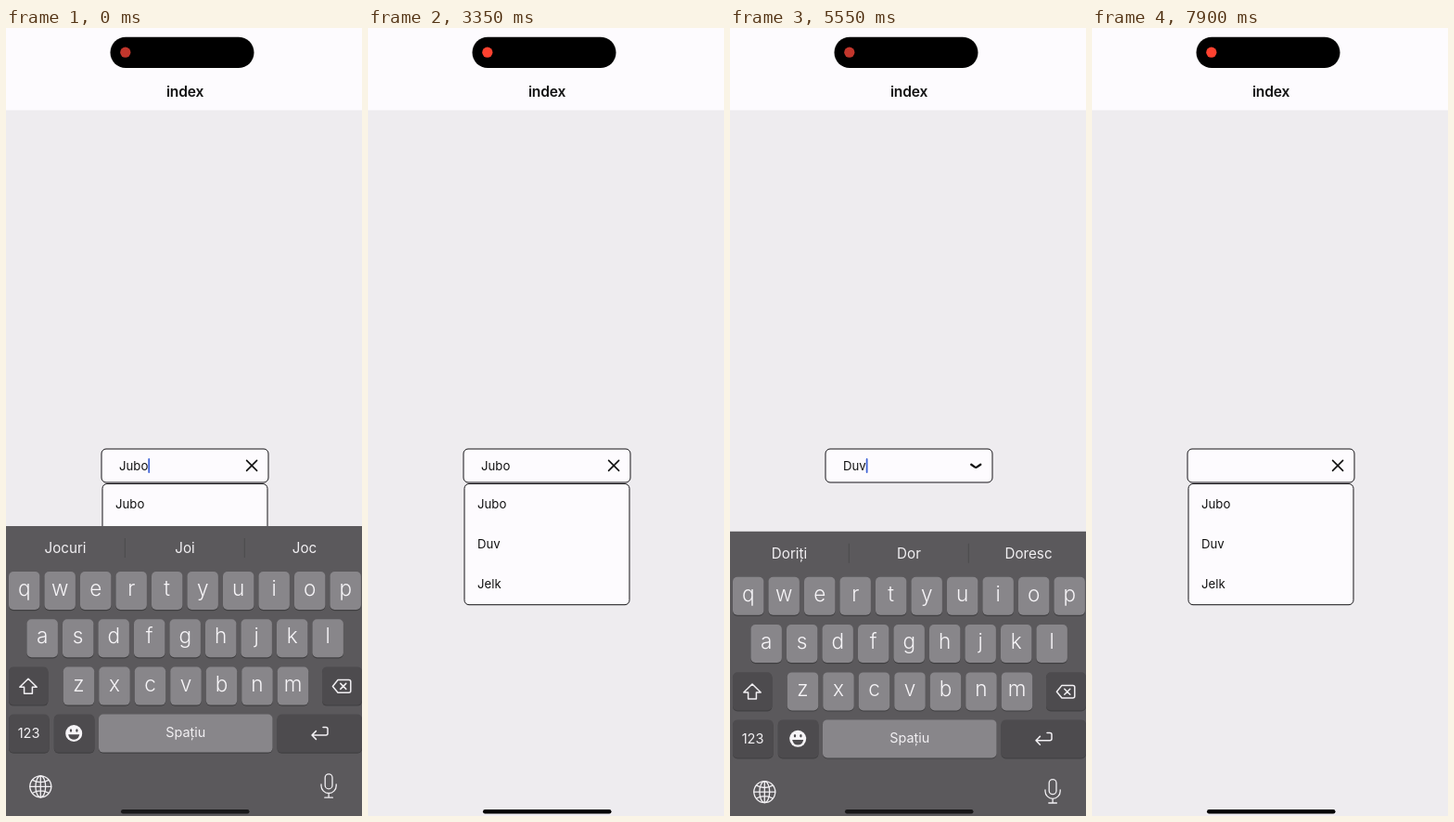
Write an HTML page that moves like this. It is 384 px wide and 848 px high and loops after 8 s.

```html
<!DOCTYPE html>
<html lang="ro">
<head>
<meta charset="utf-8">
<title>index</title>
<style>
  html, body { margin: 0; width: 100%; height: 100%; overflow: hidden; background: #eeecef; }
  svg { display: block; width: 384px; height: 848px; }
  text { font-family: Inter, Roboto, "Liberation Sans", sans-serif; white-space: pre; }
  .field { font-size: 13.2px; fill: #111; }
  .mid { text-anchor: middle; }
  .key { font-weight: 300; fill: #f6f4f7; }
  .label { fill: #f2f0f3; }
  .line { fill: none; stroke: #f2f0f3; stroke-width: 1.5; stroke-linecap: round; stroke-linejoin: round; }
  .box { fill: #fdfbfe; stroke: #141316; }
  .dark { fill: none; stroke: #111; stroke-linecap: round; }
</style>
</head>
<body>
<svg viewBox="0 0 384 848">
  <rect width="384" height="848" fill="#eeecef"/>
  <rect width="384" height="88.5" fill="#fdfbfe"/>
  <rect x="112.5" y="9.7" width="155" height="33.3" rx="16.6"/>
  <circle id="dot" cx="128.8" cy="26.2" r="5.6"/>
  <text class="mid" x="193" y="74" font-size="15.6" font-weight="600" letter-spacing="-.2" fill="#111">index</text>

  <rect class="box" x="103" y="453" width="180" height="36" rx="5"/>
  <text id="value" class="field" x="122" y="475.6"></text>
  <rect id="caret" y="463" width="1.8" height="16" rx=".9" fill="#3f63d6"/>
  <path id="cross" class="dark" stroke-width="1.6" d="M259.6 465.4 270.6 476.4M270.6 465.4 259.6 476.4"/>
  <path id="chevron" class="dark" stroke-width="2.3" d="M260.2 469.8 263.9 472.4Q265.2 473.3 266.5 472.4L270.3 469.8"/>
  <g id="list">
    <rect class="box" x="104" y="490.5" width="178" height="130.2" rx="5"/>
  </g>

  <g id="board">
    <rect y="536" width="384" height="312" fill="#5b595c"/>
    <path d="M128.3 549V570M257.3 549V570" stroke="#4c4a4d"/>
    <g id="hints"></g>
    <g id="keys"></g>
    <path id="shift" class="line" d="M24 700.3 33.2 709.2H28.4V716.3H19.6V709.2H14.8Z"/>
    <path class="line" d="M358 701.6H369.8a2 2 0 0 1 2 2V713.2a2 2 0 0 1-2 2H358L352.4 708.4ZM360.8 705.4 366.8 711.4M366.8 705.4 360.8 711.4"/>
    <path class="line" d="M342 752.6H345a2 2 0 0 1 2 2V759a2 2 0 0 1-2 2H330M334.4 756.6 330 761 334.4 765.4"/>
    <text class="label mid" x="24.6" y="764" font-size="14.6">123</text>
    <text class="label mid" x="193.8" y="763.2" font-size="14.4">Spațiu</text>
    <circle cx="73.2" cy="759" r="9" fill="#f6f4f7"/>
    <g fill="#4f4d50">
      <ellipse cx="70" cy="756" rx="1.2" ry="1.7"/>
      <ellipse cx="76.4" cy="756" rx="1.2" ry="1.7"/>
      <path d="M67.2 760.2H79.2Q78.2 765.8 73.2 765.8T67.2 760.2Z"/>
    </g>
    <g class="line" style="stroke-width:1.3">
      <circle cx="37.3" cy="816.3" r="11.5"/>
      <ellipse cx="37.3" cy="816.3" rx="5.4" ry="11.5"/>
      <path d="M25.8 816.3H48.8M37.3 804.8V827.8M28.6 809.4Q37.3 814 46 809.4M28.6 823.2Q37.3 818.6 46 823.2"/>
      <rect x="344.2" y="802.8" width="7.8" height="16" rx="3.9"/>
      <path d="M340 814V815.4a8.1 8.1 0 0 0 16.2 0V814M348.1 823.6V828M343.8 828.2H352.4"/>
    </g>
  </g>
  <rect id="home" x="124" y="841" width="138.5" height="4.4" rx="2.2"/>
</svg>
<script>
const LOOP = 8000, DROP = 312;
const HIDE = 475, CLOSE = 3900, SHOW = 5300, OPEN = 6000, CLEAR = 6480, HIDE2 = 7400;
const NAMES = ["Jubo", "Duv", "Jelk"];
const VALUES = [[0, NAMES[0]], [CLOSE, NAMES[1]], [6150, NAMES[1].slice(0, 2)], [6330, "D"], [CLEAR, ""]];
const HINTS = [[0, ["Jocuri", "Joi", "Joc"]], [2000, ["Doriți", "Dor", "Doresc"]], [6330, ["„D”", "", ""]]];

const $ = id => document.getElementById(id);
const clamp = v => Math.max(0, Math.min(1, v));
const at = (table, t) => table.filter(row => row[0] <= t).pop()[1];
const show = (el, on) => el.style.display = on ? "" : "none";

function add(parent, tag, attrs, text = "") {
  const el = document.createElementNS("http://www.w3.org/2000/svg", tag);
  for (const k in attrs) el.setAttribute(k, attrs[k]);
  el.textContent = text;
  return parent.appendChild(el);
}

function key(x, y, w, fill) {
  add($("keys"), "rect", { x, y: y + 1.2, width: w, height: 41, rx: 5, fill: "#414042" });
  return add($("keys"), "rect", { x, y, width: w, height: 41, rx: 5, fill });
}

NAMES.forEach((n, i) => add($("list"), "text", { class: "field", x: 118, y: 517.2 + 43 * i }, n));

const letters = [];
[["qwertyuiop", 3], ["asdfghjkl", 22.5], ["zxcvbnm", 61.8]].forEach(([row, x0], r) => {
  [...row].forEach((ch, i) => {
    const x = x0 + 38.5 * i, y = 585 + 51.3 * r;
    key(x, y, 33.4, "#88868a");
    letters.push({ ch, y, el: add($("keys"), "text", { class: "key mid", x: x + 16.7 }) });
  });
});
const DIM = "#4d4b4e";
const shiftKey = key(3, 687.4, 42.4, DIM);
key(341, 687.4, 43, DIM);
key(3, 738.6, 43.6, DIM);
key(51.8, 738.6, 43.6, DIM);
key(100, 738.6, 187.5, "#88868a");
key(292.5, 738.6, 91.5, DIM);

// Critically damped spring, 0 to 1
function spring(ms) {
  const x = Math.max(0, ms) * 0.0236;
  return 1 - (1 + x) * Math.exp(-x);
}

function setCase(upper) {
  for (const { ch, y, el } of letters) {
    el.textContent = upper ? ch.toUpperCase() : ch;
    el.setAttribute("y", y + (upper ? 28.4 : 26));
    el.setAttribute("font-size", upper ? 21 : 22.6);
  }
  shiftKey.setAttribute("fill", upper ? "#dcdadd" : DIM);
  $("shift").style.fill = upper ? "#000" : "none";
  $("shift").style.stroke = upper ? "#000" : "";
}

let hintSpans = [];
function setHints(words) {
  $("hints").textContent = "";
  hintSpans = [];
  words.forEach((word, i) => {
    const el = add($("hints"), "text", { class: "label mid", x: 64 + 129 * i, y: 565, "font-size": 15.2 });
    [...word].forEach((ch, j) => hintSpans.push([add(el, "tspan", {}, ch), j]));
  });
}

let lastCase, lastHints, lastValue;
function draw(t) {
  const beat = clamp(0.5 + 0.9 * Math.cos((t - 530) / 1500 * 2 * Math.PI));
  const mix = (a, b) => Math.round(a + (b - a) * beat);
  $("dot").setAttribute("fill", `rgb(${mix(194, 255)},${mix(54, 66)},${mix(44, 48)})`);

  const leaving = t < SHOW ? spring(t - HIDE) : spring(t - HIDE2);
  const down = t < SHOW || t >= HIDE2 ? leaving : 1 - spring(t - SHOW);
  $("board").setAttribute("transform", `translate(0 ${(DROP * down).toFixed(2)})`);
  show($("board"), down < 0.999);
  $("home").setAttribute("fill-opacity", 0.72 + 0.28 * clamp(down * 3));

  const upper = t >= CLEAR;
  if (upper !== lastCase) setCase(lastCase = upper);
  const hints = at(HINTS, t);
  if (hints !== lastHints) setHints(lastHints = hints);
  const edge = 90 - 107 * leaving;
  for (const [el, j] of hintSpans) el.setAttribute("fill-opacity", clamp((edge - 8 * j) / 28));

  const value = at(VALUES, t);
  if (value !== lastValue) $("value").textContent = lastValue = value;
  const width = value ? $("value").getComputedTextLength() : 0;
  $("caret").setAttribute("x", 122 + width);
  show($("caret"), t < HIDE || (t >= SHOW && t < HIDE2));

  const open = t < CLOSE || t >= OPEN;
  show($("list"), open);
  show($("cross"), open);
  show($("chevron"), !open);
}

const start = performance.now();
function tick() {
  draw((performance.now() - start) % LOOP);
  requestAnimationFrame(tick);
}
tick();
</script>
</body>
</html>
```
